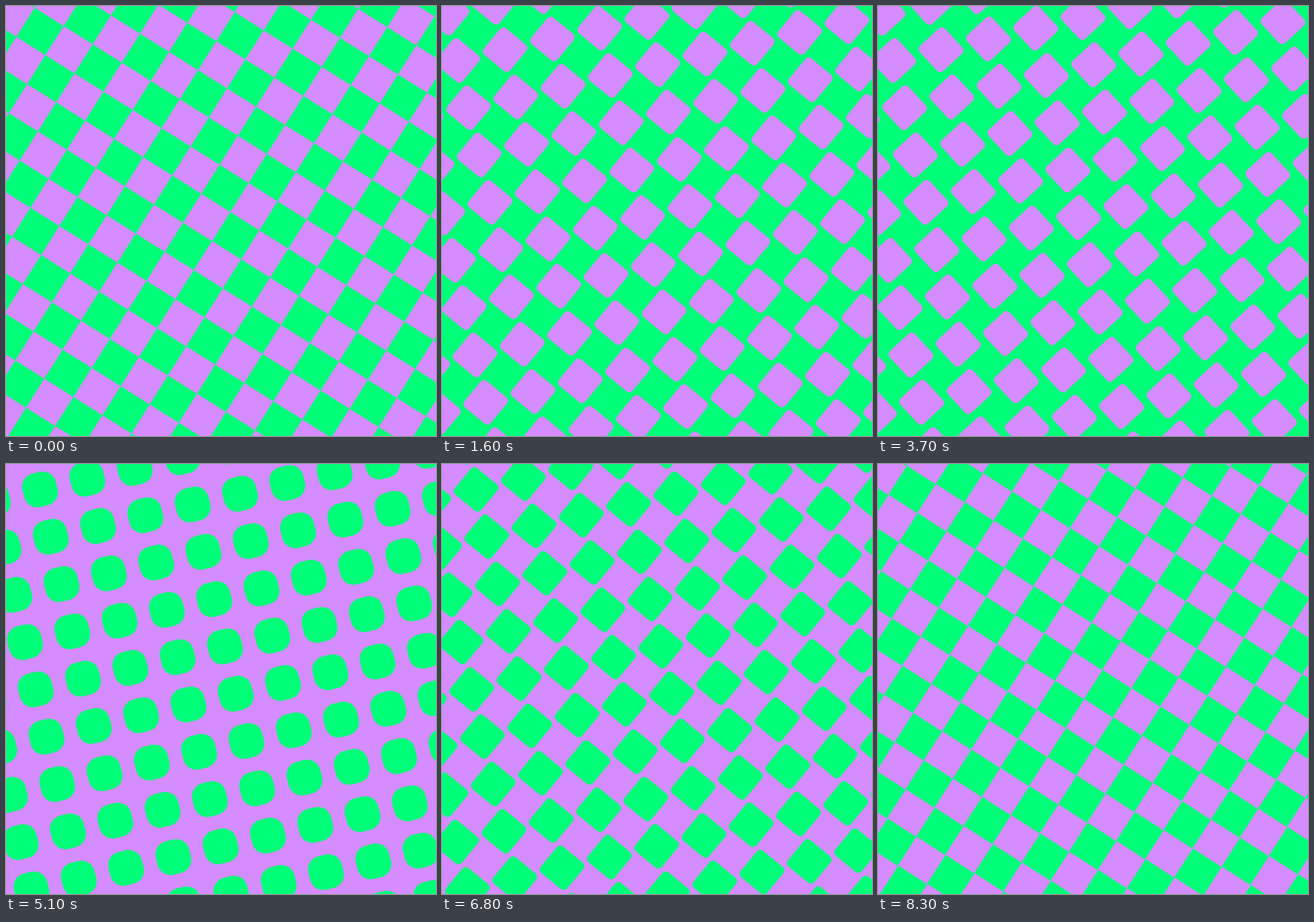
An HTML page for the animation above (8400 ms loop, 600 by 600 pixels).

```html
<!DOCTYPE html>
<html lang="en">
<head>
<meta charset="utf-8">
<title>Turning checkerboard</title>
<style>
  html, body { margin: 0; width: 100%; height: 100%; overflow: hidden; }
  svg { display: block; width: 100%; height: 100%; }
</style>
</head>
<body>
<svg viewBox="0 0 600 600">
  <defs><rect id="tile"/></defs>
  <rect id="back" width="600" height="600"/>
  <g id="grid"></g>
</svg>
<script>
const NS = 'http://www.w3.org/2000/svg';
const PURPLE = '#d48cff', GREEN = '#00ff78';
const HALF = 4200, STEP = 100;
const DX = 66, DY = 15;                      // lattice step
const SIDE = Math.hypot(DX, DY) / Math.SQRT2;
const BASE = 45 - Math.atan2(DY, DX) * 180 / Math.PI;
const SWING = 112.5;

const tile = document.getElementById('tile');
const back = document.getElementById('back');
const grid = document.getElementById('grid');

function setAttrs(el, attrs) {
  for (const key in attrs) el.setAttribute(key, attrs[key]);
}

function buildGrid() {
  for (let a = -5; a < 13; a++) {
    for (let b = -5; b < 13; b++) {
      const x = 22 + DX * a + DY * b, y = 76 - DY * a + DX * b;
      if (Math.min(x, y) < -80 || Math.max(x, y) > 680) continue;
      const use = document.createElementNS(NS, 'use');
      setAttrs(use, { href: '#tile', x, y });
      grid.appendChild(use);
    }
  }
}

function draw(ms) {
  const t = Math.floor((ms + 0.5) / STEP) * STEP % (2 * HALF);
  const second = t >= HALF;
  const e = (1 - Math.cos(2 * Math.PI * t / HALF)) / 2;
  const round = SIDE / 2 * (1 - Math.abs(1 - 2 * e));
  setAttrs(tile, {
    x: -SIDE / 2, y: -SIDE / 2, width: SIDE, height: SIDE,
    rx: round, ry: round, transform: `rotate(${BASE + SWING * e})`
  });
  back.setAttribute('fill', second ? PURPLE : GREEN);
  // the second colour sits on the gaps of the first
  setAttrs(grid, {
    fill: second ? GREEN : PURPLE,
    transform: second ? `translate(${(DX - DY) / 2} ${-(DX + DY) / 2})` : 'translate(0 0)'
  });
}

buildGrid();
draw(0);
const start = performance.now();
function frame() {
  draw(performance.now() - start);
  requestAnimationFrame(frame);
}
requestAnimationFrame(frame);
</script>
</body>
</html>
```
